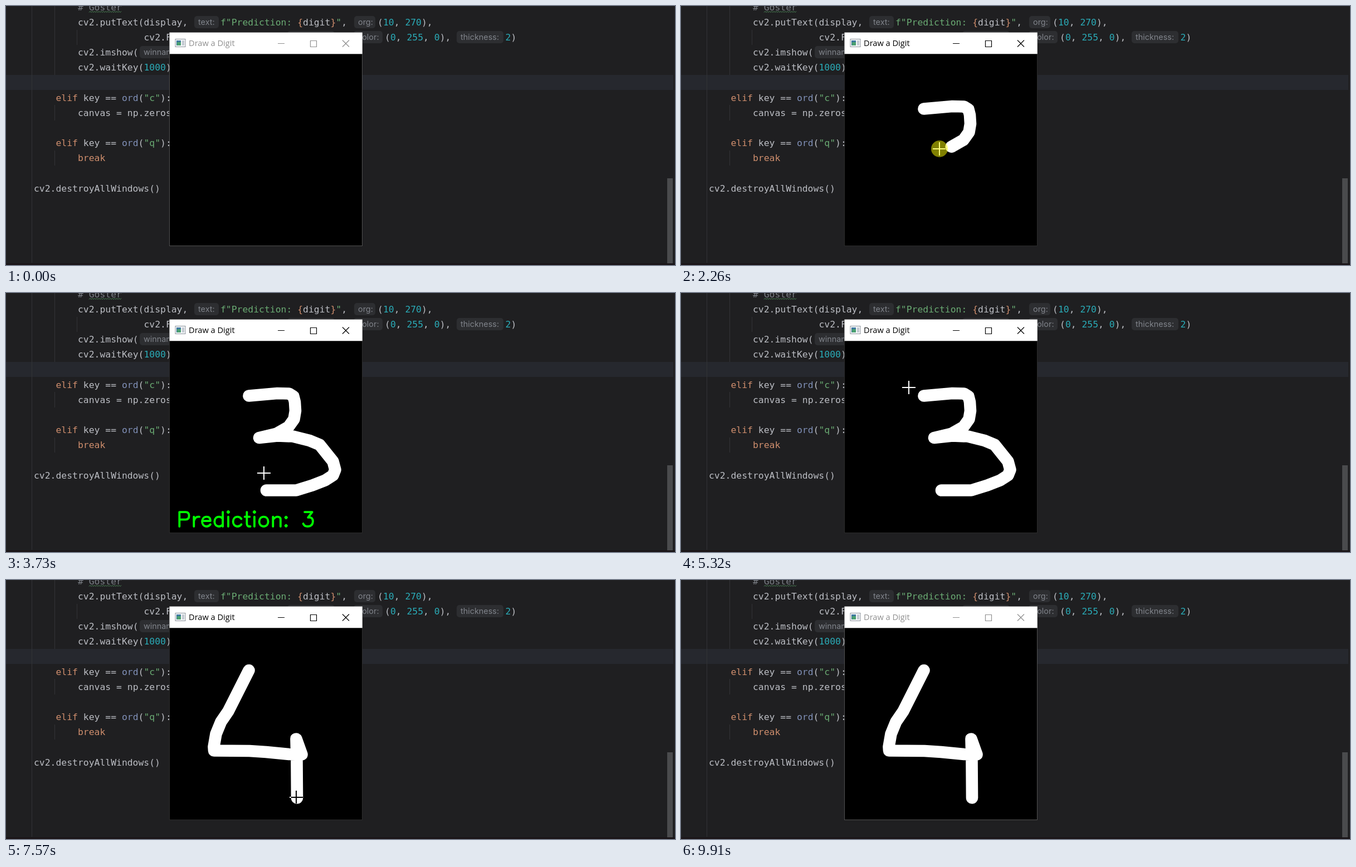
Recreate the animation shown at these times as an HTML page. Size 1201 px wide and 466 px high, loop 9.98 s.

```html
<!DOCTYPE html>
<html lang="en">
<head>
<meta charset="utf-8">
<title>Draw a Digit</title>
<style>
  html, body { margin: 0; width: 100%; height: 100%; overflow: hidden; background: #1f1f21; }
  svg { display: block; width: 1201px; height: 466px; isolation: isolate; }
  text { white-space: pre; }
  .code { font: 16.4px "DejaVu Sans Mono", monospace; fill: #bcbec4; }
  .kw { fill: #cf8e6d; }
  .str { fill: #6aab73; }
  .num { fill: #2aacb8; }
  .fn { fill: #8090b8; }
  .note { fill: #7a7e85; }
  .hint rect { fill: #2d2e31; }
  .hint text { font: 14.4px Inter, sans-serif; fill: #80848b; }
  .guide { stroke: #323336; fill: none; }
  .ink { fill: none; stroke: #fff; stroke-width: 21.6; stroke-linecap: round; stroke-linejoin: round; }
  #title { font: 14.6px "Open Sans", "Noto Sans", sans-serif; }
  #label { fill: none; stroke: #0f0; stroke-width: 3.1; stroke-linecap: round; stroke-linejoin: round; }
  #pointer { mix-blend-mode: difference; }
</style>
</head>
<body>
<svg viewBox="0 0 1201 466">
  <rect width="1201" height="466" fill="#1f1f21"/>
  <rect y="124" width="1198" height="27" fill="#26282e"/>
  <path class="guide" d="M46.5 0V462M87.5 0V124M127.5 43V70M87.5 178V206M87.5 260V287"/>
  <rect x="1187" y="310" width="10" height="156" fill="#4a4b4d"/>
  <rect y="463" width="1201" height="3" fill="#1a1518"/>

  <g class="code">
    <text class="note" x="129" y="8.2"># Goster</text>
    <text x="129" y="34.5">cv2.putText(display,</text>
    <text x="385" y="34.5"><tspan class="str">f"Prediction: </tspan><tspan class="kw">{</tspan>digit<tspan class="kw">}</tspan><tspan class="str">"</tspan>,</text>
    <text x="667" y="34.5">(<tspan class="num">10</tspan>, <tspan class="num">270</tspan>),</text>
    <text x="247.5" y="61.7">cv2.FONT_HERSHEY_SIMPLEX,</text>
    <text x="680" y="61.7">(<tspan class="num">0</tspan>, <tspan class="num">255</tspan>, <tspan class="num">0</tspan>),</text>
    <text x="896.5" y="61.7"><tspan class="num">2</tspan>)</text>
    <text x="129" y="88.9">cv2.imshow(</text>
    <text x="129" y="116.1">cv2.waitKey(<tspan class="num">1000</tspan>)</text>
    <text x="89.5" y="170.5"><tspan class="kw">elif</tspan> key == <tspan class="fn">ord</tspan>(<tspan class="str">"c"</tspan>):</text>
    <text x="129" y="197.7">canvas = np.zeros</text>
    <text x="89.5" y="252.1"><tspan class="kw">elif</tspan> key == <tspan class="fn">ord</tspan>(<tspan class="str">"q"</tspan>):</text>
    <text class="kw" x="129" y="279.3">break</text>
    <text x="50" y="333.7">cv2.destroyAllWindows()</text>
  </g>
  <path d="M149 11.5l2-2 2 2 2-2 2 2 2-2 2 2 2-2 2 2 2-2 2 2 2-2 2 2 2-2 2 2 2-2 2 2 2-2 2 2 2-2 2 2 2-2 2 2 2-2 2 2 2-2 2 2 2-2 2 2 2-2" fill="none" stroke="#4f8a5a"/>
  <g id="hints" class="hint"></g>

  <rect x="293" y="48" width="347" height="384" fill="#000"/>
  <rect id="border" x="293.5" y="86" width="346" height="345.5" fill="none"/>
  <rect x="293.4" y="47.6" width="346.4" height="38.6" fill="#fff"/>
  <rect x="304" y="59.5" width="18" height="14" fill="#f4f6f8" stroke="#8d949c"/>
  <rect x="306" y="62" width="8" height="9" fill="#3f78a0"/>
  <rect x="307" y="65" width="7" height="6" fill="#4aa070"/>
  <rect x="316" y="62" width="4" height="9" fill="#c3cad2"/>
  <g id="chrome">
    <text id="title" x="328" y="72">Draw a Digit</text>
    <path d="M488 67.5H500M546.5 62.5H557.5V73.5H546.5ZM604 61.5L616 73.5M616 61.5L604 73.5" fill="none" stroke-width="1.2" stroke="currentColor"/>
  </g>

  <path id="three" class="ink" d="M436 185L487 180.5 508 181 516 186 518.5 196 519.5 212 517 227 507 241 486 253 454.5 260.5 487 257 515 258 545 265.5 563 273 587 303 591 318 587 328 573 337 550 346 521 355 467.5 355"/>
  <path id="four" class="ink" d="M436 162.5L399 236 386 255 377 277 373 300 373.5 307 437 307.5 467 309.5 508 313.5 531 314 521 286 522 325 522.5 392"/>
  <g id="label" role="img" transform="translate(306.4 420) scale(1.235 -1.235)"></g>

  <path id="pointer" fill="none" stroke="#fff"/>
  <circle id="halo" r="15" fill="#ff0" opacity=".5"/>
</svg>
<script>
const LOOP = 9980, STEP = 66.53, SLACK = 17;
const $ = id => document.getElementById(id);

// Parameter hints: x, y, width, text
$('hints').innerHTML = [
  [338, 18, 44, 'text:'], [625, 18, 38, 'org:'], [505, 45, 85, 'fontScale:'],
  [624, 45, 52, 'color:'], [809, 45, 84, 'thickness:'], [240, 72, 72, 'winname:'],
].map(([x, y, w, s]) => `<rect x="${x}" y="${y}" width="${w}" height="22" rx="5"/>
  <text x="${x + 7}" y="${y + 15.8}">${s}</text>`).join('');

// Single-stroke letters, y up: advance width and path
const bowl = 'C13.5 13 12 14 9.5 14C5.5 14 3 11 3 7C3 3 5.5 0 9.5 0C12 0 13.5 1 15 3';
const dot = y => `M4 ${y + 1}l-1-1 1-1 1 1z`;
const GLYPHS = {
  'P': [21, 'M4 0V21H13Q18 21 18 15.5T13 10H4'],
  'r': [13, 'M4 14V0M4 8Q6 14 10 14H12'],
  'e': [18, 'M3 8H15Q15 14 9.5 14C5.5 14 3 11 3 7C3 3 5.5 0 9.5 0C12 0 13.5 1 15 3'],
  'd': [19, 'M15 21V0M15 11' + bowl],
  'i': [8, dot(21) + 'M4 14V0'],
  'c': [18, 'M15 11' + bowl],
  't': [12, 'M5 21V4Q5.5 0 8 0H10M2 14H9'],
  'o': [19, 'M3 7C3 11 5.5 14 9.5 14S16 11 16 7 13.5 0 9.5 0 3 3 3 7Z'],
  'n': [19, 'M4 14V0M4 10Q7.5 14 10.5 14Q15 14 15 10V0'],
  ':': [10, dot(13) + dot(1)],
  ' ': [16, ''],
  '3': [20, 'M5 21H16L10 13H13Q17 12.5 17 7Q16.5 0 9.5 0Q4.5 0 3 4'],
  '4': [20, 'M13 0V21L3 7H18'],
};

function strokeText(s) {
  let x = 0;
  return [...s].map(ch => {
    const [w, d] = GLYPHS[ch], at = x;
    x += w;
    return `<path transform="translate(${at} 0)" d="${d}"/>`;
  }).join('');
}

// Free pointer moves: step, x, y
const MOVES = [
  [2, 955, 413], [6, 645, 265], [10, 440, 185], [12, 440, 185], [13, 434, 185],
  [42, 463.5, 352], [46, 463.5, 352], [48, 463, 324], [59, 463, 324], [62, 463, 317],
  [65, 463, 317], [67, 456, 309], [74, 456, 309], [77, 440, 250], [80, 409, 170],
  [83, 409, 170], [87, 434, 163], [114, 521, 391], [116, 521, 391], [117, 521, 387],
  [121, 521, 387], [124, 526, 402], [129, 526, 402], [132, 523, 290], [134, 522, 206],
  [138, 522, 206], [141, 740, 290], [144, 1163, 459],
];

// Pen strokes: pressed span, moment of clearing, [step, distance along the path]
const STROKES = [
  { el: $('three'), down: 30, up: 42, clear: 83, keys: [[31, 0], [34, 185], [41.6, 505]] },
  { el: $('four'), down: 91, up: 114, clear: 150,
    keys: [[92, 0], [97.6, 160], [98, 160], [99.6, 318], [103, 318], [105, 347.5], [106, 347.5], [108.6, 460]] },
];
const LAG = 0.32;
for (const s of STROKES) s.len = s.el.getTotalLength();

function sample(keys, n) {
  if (n <= keys[0][0]) return keys[0].slice(1);
  for (let i = 1; i < keys.length; i++) {
    const a = keys[i - 1], b = keys[i];
    if (n <= b[0]) {
      const k = (n - a[0]) / (b[0] - a[0]);
      return a.slice(1).map((v, j) => v + (b[j + 1] - v) * k);
    }
  }
  return keys[keys.length - 1].slice(1);
}

const show = (el, on) => { el.style.display = on ? '' : 'none'; };
let shown = '';

function setLabel(s) {
  if (s === shown) return;
  shown = s;
  $('label').innerHTML = strokeText(s);
  $('label').setAttribute('aria-label', s);
}

function draw(n) {
  const active = n >= 30 && n < 149;
  const tone = active ? '#000' : '#8f8f8f';
  $('chrome').style.color = tone;
  $('title').style.fill = tone;
  $('border').style.stroke = active ? '#2b2b2b' : '#505050';

  let [x, y] = sample(MOVES, n), pressed = false;
  for (const s of STROKES) {
    const at = k => Math.min(s.len, sample(s.keys, k)[0]);
    const inked = at(n - LAG);
    show(s.el, inked > 0 && n < s.clear);
    s.el.style.strokeDasharray = `${inked} 2000`;
    if (n >= s.down && n < s.up) {
      const p = s.el.getPointAtLength(at(n));
      x = p.x - 2;
      y = p.y - 0.5;
      pressed = true;
    }
  }

  setLabel(n >= 56 && n < 71 ? 'Prediction: 3' : n >= 127 && n < 142 ? 'Prediction: 4' : '');

  x = Math.round(x);
  y = Math.round(y);
  const inside = x > 293 && x < 640 && y > 86 && y < 432;
  const pointer = $('pointer');
  show(pointer, n >= 2 && n < 145);
  pointer.setAttribute('stroke-width', inside ? 2 : 1);
  pointer.setAttribute('d', inside
    ? `M${x - 12} ${y}h24M${x} ${y - 12}v24`
    : `M${x - 3.5} ${y - 8.5}h3M${x + 0.5} ${y - 8.5}h3M${x} ${y - 8}v16M${x - 3.5} ${y + 8.5}h3M${x + 0.5} ${y + 8.5}h3`);
  show($('halo'), pressed);
  $('halo').setAttribute('cx', x);
  $('halo').setAttribute('cy', y);
}

function tick() {
  const t = performance.now() % LOOP;
  draw(Math.floor((t + SLACK) / STEP) % 150);
  requestAnimationFrame(tick);
}
tick();
</script>
</body>
</html>
```
